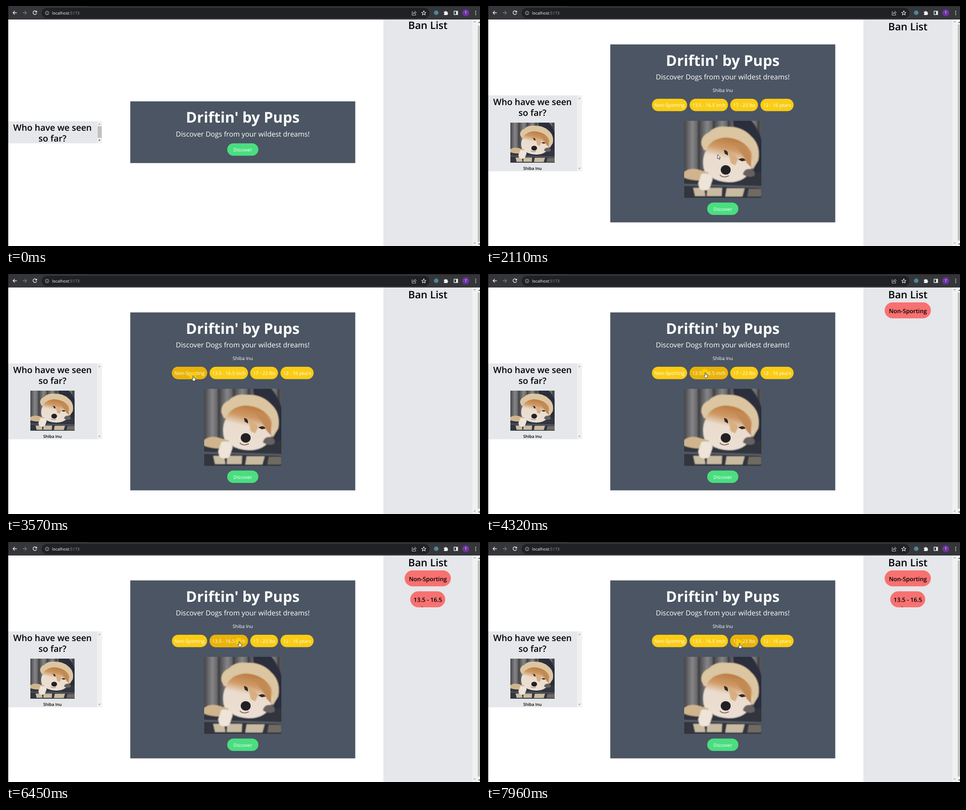
Write an HTML page that moves like this. It is 1050 by 533 pixels and loops after 8 s.

```html
<!DOCTYPE html>
<html lang="en">
<head>
<meta charset="utf-8">
<title>Dog discovery page</title>
<style>
html, body { margin: 0; width: 100%; height: 100%; overflow: hidden; background: #fff; }
svg.stage { display: block; width: 100vw; height: 100vh; }
text { font-family: "Open Sans", "Noto Sans", sans-serif; text-anchor: middle; fill: #fff; text-rendering: geometricPrecision; }
.title { font-size: 32.9px; font-weight: 700; }
.sub { font-size: 15.5px; }
.small { font-size: 10.5px; }
.name { font-size: 10.35px; }
.head { font-weight: 600; fill: #000; font-size: 19.4px; }
.ban { font-size: 22.7px; }
.tag { font-size: 13.1px; }
.dark { fill: #000; font-weight: 600; font-size: 9.1px; }
.pill { fill: #facc15; }
.lit { fill: #eab308; }
.go { fill: #4ade80; }
.goLit { fill: #22c55e; }
.red { fill: #f87171; }
.panel { fill: #4b5563; }
.grey { fill: #e5e7eb; }
.bar { fill: #f1f1f1; }
.thumb { fill: #c1c1c1; }
.icon { fill: none; stroke: #e8eaed; stroke-width: 1.4; }

/* Every switch shares one clock; percentages are ms / 80. */
.sw { animation: 8s step-end infinite; }
.first { animation-name: first; }
.second { animation-name: second; }
.goLit { animation-name: press; }
.lit1 { animation-name: lit1; }
.lit2 { animation-name: lit2; }
.lit3 { animation-name: lit3; }
.ban1 { animation-name: ban1; }
.ban2 { animation-name: ban2; }
.hand { animation-name: hand; }
.arrow { animation-name: arrow; }
.click { animation-name: click; }
.pointer { animation: move 8s ease-in-out infinite; }

@keyframes first { 0% { opacity: 1 } 26.375%, 100% { opacity: 0 } }
@keyframes second { 0% { opacity: 0 } 26.375%, 100% { opacity: 1 } }
@keyframes press { 0%, 26.375%, 100% { opacity: 0 } 8.5% { opacity: 1 } }
@keyframes lit1 {
  0%, 48.9%, 94.2%, 100% { opacity: 0 }
  36%, 86.25% { opacity: 1 }
}
@keyframes lit2 {
  0%, 59.4%, 86%, 96.4%, 100% { opacity: 0 }
  49.25%, 77.75%, 94.4% { opacity: 1 }
}
@keyframes lit3 {
  0%, 77.75% { opacity: 0 }
  77.25%, 96.7%, 100% { opacity: 1 }
}
@keyframes ban1 { 0% { opacity: 0 } 45.5%, 100% { opacity: 1 } }
@keyframes ban2 { 0% { opacity: 0 } 54.75%, 100% { opacity: 1 } }
@keyframes hand {
  0%, 23.1%, 59.4%, 72.9% { opacity: 0 }
  8.5%, 36%, 62.75%, 77.25%, 100% { opacity: 1 }
}
@keyframes arrow {
  0%, 8.5%, 36%, 62.75%, 77.25%, 100% { opacity: 0 }
  2.375%, 23.1%, 59.4%, 72.9% { opacity: 1 }
}
@keyframes click {
  0%, 17.375%, 45.5%, 57.25%, 82%, 92% { opacity: 0 }
  10.875%, 43.75%, 54%, 79.75%, 90.25%, 99.25%, 100% { opacity: 1 }
}
@keyframes move {
  0%, 2.375% { transform: translate(956px, 525px); animation-timing-function: ease-out }
  9.125%, 22.5% { transform: translate(516px, 331px) }
  23.875%, 26.375% { transform: translate(513px, 330px) }
  32.25% { transform: translate(463px, 310px) }
  36.375%, 46.25% { transform: translate(415px, 226px) }
  52.25%, 58% { transform: translate(486px, 219px) }
  63.75% { transform: translate(922px, 125px) }
  65.5%, 68.875% { transform: translate(923px, 134px) }
  71.25% { transform: translate(925px, 72px) }
  78.875%, 82% { transform: translate(517px, 221px) }
  89.25%, 92% { transform: translate(410px, 229px) }
  98.5%, 100% { transform: translate(562px, 225px) }
}
</style>
</head>
<body>
<svg class="stage" viewBox="0 0 1050 533" preserveAspectRatio="none">
  <defs>
    <linearGradient id="slats" x2="33" gradientUnits="userSpaceOnUse" spreadMethod="repeat">
      <stop offset="0" stop-color="#454548"/><stop offset=".3" stop-color="#6a6a6c"/>
      <stop offset=".55" stop-color="#858587"/><stop offset=".85" stop-color="#68686a"/>
      <stop offset="1" stop-color="#3b3b3e"/>
    </linearGradient>
    <linearGradient id="fur" x1=".65" y1="0" x2=".4" y2="1">
      <stop offset="0" stop-color="#b9783f"/><stop offset=".28" stop-color="#cf9a66"/>
      <stop offset=".48" stop-color="#eadccd"/><stop offset="1" stop-color="#ebe0d5"/>
    </linearGradient>
    <filter id="soft" x="0" y="0" width="1" height="1"><feGaussianBlur stdDeviation="1"/></filter>
    <symbol id="photo" viewBox="0 0 171 171" preserveAspectRatio="none">
      <rect width="171" height="171" fill="url(#slats)"/>
      <g filter="url(#soft)">
        <path d="M-5-5H176V176H-5Z" fill="none"/>
        <path d="M108-5H145Q168 20 176 60V140H120Z" fill="#2a2e3c"/>
        <path d="M-5 128L40 108 120 125 176 112V176H-5Z" fill="#33363e"/>
        <path d="M-5 142L176 147" stroke="#5a5e67" stroke-width="4"/>
        <path d="M20 149h24l3 18H24ZM51 149h33l-1 18H50ZM94 150h40l-5 18H91Z" fill="#c9bba2"/>
        <path d="M143 151h28v17h-31Z" fill="#6f6a62"/>
        <path d="M38 53Q36 34 54 26 68 10 94 13 128 12 148 34 170 54 164 88L152 108 135 70 90 40 62 60 44 66Z" fill="#dcc6a2"/>
        <path d="M48 66Q58 40 90 37 130 38 148 68 157 98 143 118 126 138 96 136 62 134 45 112 37 88 48 66Z" fill="url(#fur)"/>
        <path d="M110 48Q135 52 148 76L149 104 139 94 131 79Z" fill="#c28a55"/>
        <path d="M98 68L108 73 120 84 113 99 103 94Z" fill="#d8ae82"/>
        <path d="M-3 116Q10 103 31 108L55 115 45 132Q18 134-1 126Z" fill="#cfb48d"/>
        <path d="M38 118Q57 113 63 130L56 151Q45 158 34 151L31 139Z" fill="#eee4d9"/>
        <path d="M130 119Q133 105 148 107 160 112 155 122 143 128 130 119Z" fill="#66605f"/>
      </g>
      <path d="M88 65Q98 65 97 77L90 73ZM120 86Q131 79 136 88L128 90Z" fill="#332a28"/>
      <ellipse cx="92" cy="109" rx="11" ry="10.5" fill="#222024"/>
      <path d="M79 120Q86 128 99 122" fill="none" stroke="#85705f" stroke-width="2"/>
    </symbol>
    <path id="up" d="M-2.5 1.5L0-1.5 2.5 1.5Z"/>
    <path id="down" d="M-2.5-1.5L0 1.5 2.5-1.5Z"/>
    <g id="intro">
      <text class="title" x="524.5" y="259">Driftin' by Pups</text>
      <text class="sub" x="524.5" y="289.5">Discover Dogs from your wildest dreams!</text>
    </g>
    <g id="seen">
      <text class="head" x="103" y="276.5">Who have we seen</text>
      <text class="head" x="103" y="301">so far?</text>
    </g>
  </defs>

  <rect width="1050" height="533" fill="#fff"/>
  <rect class="grey" x="836" y="30" width="197" height="503"/>
  <rect class="bar" x="1033" y="30" width="17" height="503"/>
  <g fill="#a3a3a3">
    <use href="#up" x="1038" y="34.5"/><use href="#down" x="1038" y="527"/>
  </g>
  <g fill="#505050">
    <use href="#up" x="1048.5" y="36"/><use href="#down" x="1048.5" y="529"/>
  </g>

  <!-- Browser bar -->
  <rect width="1050" height="30" fill="#35363a"/>
  <rect x="178" width="872" height="1" fill="#202124"/>
  <rect x="79" y="4" width="859" height="23" rx="11.5" fill="#202124"/>
  <rect width="5" height="533" fill="#000"/>
  <g class="icon">
    <path d="M24 15H15.5M19.5 11L15.5 15 19.5 19"/>
    <path d="M37 15H45.5M41.5 11L45.5 15 41.5 19" stroke="#77797d"/>
    <path d="M67.3 12.6A4 4 0 1 0 67.8 16M68 10.5V13.5H65"/>
    <g stroke="#bdc1c6" stroke-width="1">
      <circle cx="91" cy="15.5" r="4"/>
      <path d="M91 15V18M91 13V14"/>
      <path d="M902 13H899.5V20.5H907.5V18M901.5 18Q902 14 906 14V11.5L909 14.8 906 18V16Q903 16 901.5 18Z"/>
    </g>
    <path d="M925.5 10.8L926.9 14 930.2 14.3 927.7 16.5 928.5 19.8 925.5 18 922.5 19.8 923.3 16.5 920.8 14.3 924.1 14Z" stroke-width="1.1"/>
    <path d="M992.5 11.5H1000.5V19H992.5Z"/>
  </g>
  <circle cx="953" cy="15" r="5" fill="#4b8799"/>
  <path d="M970 12.5H972.5A1.7 1.7 0 0 1 975.8 12.5H978V15A1.7 1.7 0 0 1 978 18.3V20H970V18A1.7 1.7 0 0 0 970 14.8Z" fill="#f1f3f4"/>
  <rect x="997" y="11.5" width="4" height="7.5" fill="#e8eaed"/>
  <circle cx="1018.5" cy="15" r="7.7" fill="#7031a8"/>
  <text x="1018.5" y="18.2" font-size="8.5">T</text>
  <g fill="#e8eaed">
    <circle cx="1040.5" cy="11.5" r="1.1"/><circle cx="1040.5" cy="15.3" r="1.1"/><circle cx="1040.5" cy="19.1" r="1.1"/>
  </g>
  <text x="102" y="18.8" font-size="9.05" style="text-anchor:start">localhost<tspan fill="#9aa0a6">:5173</tspan></text>

  <!-- Start page -->
  <g class="sw first">
    <text class="head ban" x="934.5" y="51">Ban List</text>
    <rect class="thumb" x="1045" y="44" width="5" height="480"/>
    <rect class="grey" x="5" y="256" width="197" height="49"/>
    <rect class="bar" x="202" y="256" width="11" height="49"/>
    <rect class="thumb" x="203" y="267" width="9" height="26"/>
    <use href="#up" x="207" y="262" fill="#a3a3a3"/><use href="#down" x="207" y="298.5" fill="#505050"/>
    <use href="#seen"/>
    <rect class="panel" x="275.3" y="211.8" width="498.4" height="137"/>
    <use href="#intro"/>
    <rect class="go" x="490" y="305" width="69" height="27.5" rx="13.75"/>
    <rect class="sw goLit" x="490" y="305" width="69" height="27.5" rx="13.75"/>
    <text class="name" x="524.5" y="323">Discover</text>
  </g>

  <!-- Page with a dog -->
  <g class="sw second">
    <text class="head ban" x="934.5" y="54">Ban List</text>
    <rect class="thumb" x="1045" y="41" width="5" height="480"/>
    <rect class="grey" x="5" y="198.5" width="197" height="168.5"/>
    <rect class="bar" x="202" y="198.5" width="11" height="168.5"/>
    <g fill="#a3a3a3"><use href="#up" x="207" y="205"/><use href="#down" x="207" y="361"/></g>
    <use href="#seen" y="-57"/>
    <use href="#photo" x="54" y="259" width="98" height="89"/>
    <text class="dark" x="103" y="364.3">Shiba Inu</text>

    <rect class="panel" x="275.3" y="85.3" width="498.4" height="395.2"/>
    <use href="#intro" y="-126.5"/>
    <text class="name" x="524.5" y="191">Shiba Inu</text>
    <g class="pill">
      <rect x="367.5" y="206" width="78" height="27.5" rx="13.75"/>
      <rect x="451" y="206" width="85" height="27.5" rx="13.75"/>
      <rect x="541" y="206" width="61.5" height="27.5" rx="13.75"/>
      <rect x="608" y="206" width="73.5" height="27.5" rx="13.75"/>
    </g>
    <g class="lit">
      <rect class="sw lit1" x="367.5" y="206" width="78" height="27.5" rx="13.75"/>
      <rect class="sw lit2" x="451" y="206" width="85" height="27.5" rx="13.75"/>
      <rect class="sw lit3" x="541" y="206" width="61.5" height="27.5" rx="13.75"/>
    </g>
    <g class="small">
      <text x="406.5" y="224" font-size="10.75">Non-Sporting</text>
      <text x="493.5" y="224">13.5 - 16.5 inch</text>
      <text x="572" y="224">17 - 23 lbs</text>
      <text x="645" y="224">12 - 16 years</text>
    </g>
    <use href="#photo" x="439" y="255" width="171" height="171"/>
    <rect class="go" x="490" y="436.5" width="69" height="27.5" rx="13.75"/>
    <text class="name" x="524.5" y="454.7">Discover</text>

    <g class="sw ban1">
      <rect class="red" x="883" y="63" width="102.5" height="35.5" rx="17.75"/>
      <text class="head tag" x="934.5" y="87">Non-Sporting</text>
    </g>
    <g class="sw ban2">
      <rect class="red" x="895.5" y="109.5" width="77.5" height="35.5" rx="17.75"/>
      <text class="head tag" x="934.5" y="133">13.5 - 16.5</text>
      <rect x="919.5" y="143.5" width="4" height="1" fill="#5b2c2c"/>
    </g>
  </g>

  <g class="pointer">
    <circle class="sw click" cx="-1.5" cy="-.5" r="7.8" fill="#f8d00a" fill-opacity=".88"/>
    <g fill="#fff" stroke="#111" stroke-width=".8" stroke-linejoin="round">
      <path class="sw arrow" d="M0 0V9.4L2.2 7.4 3.7 10.8 5.2 10.1 3.7 6.9H6.6Z"/>
      <path class="sw hand" d="M-1 1A1 1 0 0 1 1 1V4.4L4 5.2Q5 5.6 4.9 6.8L4.4 9.8 3.8 11.6H-.4L-3.4 7.3Q-3.5 6.2-2.3 6.4L-1 7.3Z"/>
    </g>
  </g>
</svg>
</body>
</html>
```
